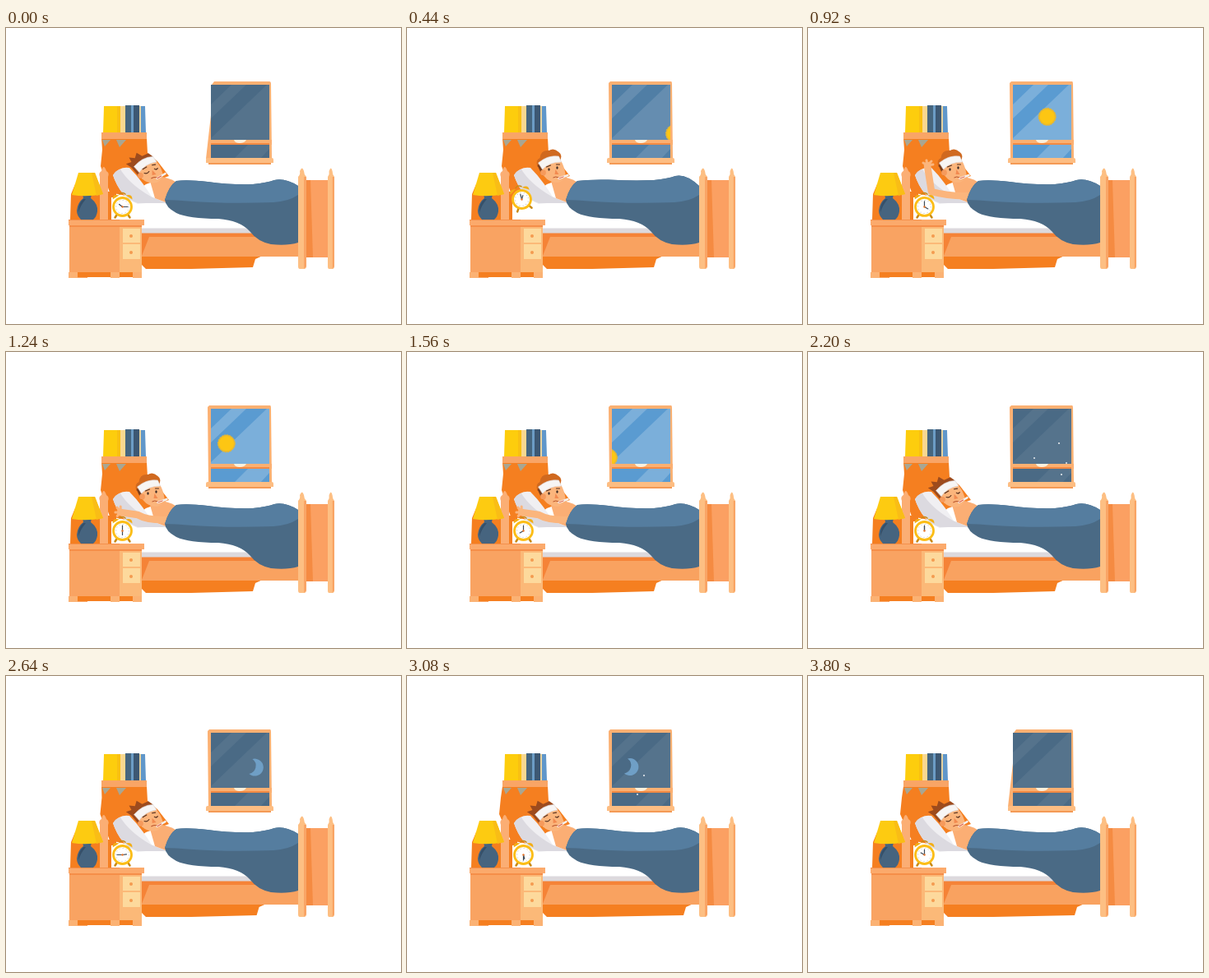
Recreate the animation shown at these times as an HTML page. Size 480 px wide and 360 px high, loop 3840 ms.

```html
<!DOCTYPE html>
<html>
<head>
<meta charset="utf-8">
<style>
html, body { margin: 0; width: 100%; height: 100%; overflow: hidden; background: #fff; }
svg { display: block; width: 480px; height: 360px; }
.awake .sleeping, .asleep .waking { display: none; }
</style>
</head>
<body>
<svg viewBox="0 0 480 360">
  <defs>
    <clipPath id="glass"><path d="M249 69h71v90h-71z"/></clipPath>
  </defs>

  <!-- wall and floor shade -->
  <g fill="#f57f20">
    <path id="wall"/>
    <path d="M84 190L79 202L78 233H134V200L117 198Z"/>
    <path id="floor"/>
  </g>

  <!-- window -->
  <path id="frame" fill="#fbb072"/>
  <g clip-path="url(#glass)">
    <path fill="#4a6a85" d="M249 69h71v90h-71z"/>
    <path id="day" fill="#5a9bd1" d="M249 69h71v90h-71z"/>
    <path id="glare" fill="#fff" d="M249 93L274 69H292L249 110ZM249 134L317 69H320V136H249ZM277 159L295 141H320V147L309 159Z"/>
    <g id="stars" fill="#fff"></g>
    <g id="sun"><circle r="10.500" fill="#e9b92f" stroke="#e9b92f" stroke-dasharray="2 1.300"/><circle r="9" fill="#fdc613"/></g>
    <path id="moon" fill="#6f9fc6" d="M-2 -10A10.500 10.500 0 1 1 -6 8A10 10 0 0 0 -2 -10Z"/>
  </g>
  <path fill="#fbb072" d="M247 136H323V142H247Z"/>
  <path fill="#f28a43" d="M249 140H320V142H249Z"/>
  <path fill="#fdf0dc" d="M277 136H292Q290 140 284 140T277 136Z"/>
  <path fill="#fdbd82" d="M243 160Q243 158 245 158H323Q325 158 325 160V164H243Z"/>
  <path fill="#f49a55" d="M246 164H322V166H246Z"/>

  <!-- shelf and books -->
  <path fill="#fdcd0d" d="M119 95H139V128H118Z"/>
  <path fill="#f9c011" d="M135 95H139V128H135Z"/>
  <path fill="#f9d88f" d="M139 95H145V128H139Z"/>
  <path fill="#46667f" d="M145 94H152V128H145Z"/>
  <path fill="#6c9cc5" d="M152 94H155V128H152Z"/>
  <path fill="#3d5873" d="M155 94H162V128H155Z"/>
  <path fill="#e6d3a0" d="M162 95H164V128H162Z"/>
  <path fill="#6097ca" d="M164 95H169L170 128H164Z"/>
  <path fill="#f9a566" d="M116 127H171V135H116Z"/>
  <path fill="#a9a692" d="M117 136H127L120 144ZM134 136H146L138 145Z"/>

  <!-- bed -->
  <path fill="#f9a260" d="M165 249H356V278H165Z"/>
  <path fill="#f58337" d="M165 249H312V254H174L165 277Z"/>
  <path fill="#fff" d="M128 206H290L306 249H165V236H128Z"/>
  <path fill="#dcd9dd" d="M165 243.500H301L306 249.500H165Z"/>
  <path fill="#f0eff2" d="M130 179Q138 168 150 170Q166 186 181 212L160 214Q139 206 130 179Z"/>
  <path fill="#dcdae0" d="M130 179Q133 173 139 172Q150 190 176 205L196 213H160Q139 206 130 179Z"/>
  <path fill="#fbae74" d="M116 174Q118.500 164 122 174Q126 176 124 181V233H114V181Q112 176 116 174Z"/>

  <!-- sleeper -->
  <path fill="#fbae74" d="M175 186L190 181Q204 184 208 189L194 212L181 207Z"/>
  <g id="arm" fill="none" stroke="#fbb57c" stroke-linecap="round" stroke-linejoin="round">
    <path id="limb" stroke-width="8.500"/>
    <path id="hand" stroke-width="3" d="M0 0L-5 -3M0 0L-1 -6M0 0L5 -5M0 0L7 -1"/>
  </g>
  <g id="head">
    <path class="sleeping" fill="#9d4b1d" d="M-20 -9L-26 -15L-19 -16L-21 -22L-14 -20L-11 -26L-5 -21L3 -23L8 -18L6 -9L-13 3Z"/>
    <g class="waking">
      <path fill="#d0691f" d="M-18 -5Q-21 -13 -15 -16Q-14 -26 -4 -25Q2 -29 8 -23Q13 -20 9 -11Z"/>
      <path fill="#7c3f1c" d="M-18 -7L9 -18L7 -12L-11 -1L-12 6Z"/>
    </g>
    <path fill="#fbb57c" d="M-13 -6L9 -15Q15 -6 16 4Q14 12 7 14Q-4 14 -10 6Z"/>
    <circle cx="-11" cy="2" r="3.400" fill="#f59a5c"/>
    <path fill="#f7f5f4" stroke="#dddbe0" stroke-width=".6" d="M-17 -10Q-5 -20 8 -18L11 -11Q-4 -11 -12 -2Z"/>
    <path fill="#f28a50" d="M4 -2L8 4L3 4Z"/>
    <g fill="none" stroke="#56301f" stroke-width="1.200" stroke-linecap="round">
      <path d="M-7 -5L-2 -7M5 -8L9 -8"/>
      <path class="sleeping" d="M-6 0Q-3 2 0 -1M7 -3Q9 -1 11 -3"/>
    </g>
    <g class="waking" fill="#3c2a25"><ellipse cx="-4" cy="-2" rx="1.200" ry="1.800"/><ellipse cx="6" cy="-4" rx="1.200" ry="1.700"/></g>
    <path fill="none" stroke="#b8532c" d="M1 8Q4 6 8 8"/>
    <path stroke="#f4f1ef" stroke-width="2.400" stroke-linecap="round" d="M8 9L19 5"/>
    <path stroke="#e45d3c" d="M8 9L14 6.800"/>
  </g>

  <!-- blanket -->
  <path id="blanket" fill="#4a6a85"/>
  <path id="fold" fill="#557d9f"/>

  <!-- footboard -->
  <path fill="#fba062" d="M364 185H393V279H364Z"/>
  <path fill="#f58b42" d="M364 185H370L373 279H364Z"/>
  <g id="post">
    <path fill="#fdbf83" d="M355 181Q358 178 357 174Q360 167 362 174Q362 178 365 181V290Q365 293 362 293H357Q355 293 355 290Z"/>
    <path fill="#f9a566" d="M362 181H365V290L362 293Z"/>
  </g>
  <use href="#post" transform="translate(107 0) scale(.8 1)"/>

  <!-- lamp -->
  <path fill="#46647f" d="M93 202H104L103 207Q112 214 111 223Q110 230 106 233H91Q86 228 86 222Q87 212 94 207Z"/>
  <path fill="#35506a" d="M94 208Q87 214 88 224Q91 215 97 208Z"/>
  <path fill="#fdcb11" d="M88 176H108L118 202Q98 206 80 203Z"/>
  <path fill="#f9bd16" d="M104 176H108L118 202L110 204Z"/>

  <!-- nightstand -->
  <path fill="#f9a362" d="M77 240H165V304H154V297H99V304H77Z"/>
  <path fill="#fbb978" d="M138 240H165V297H138Z"/>
  <path fill="#f57f20" d="M87 297H154V303H87Z"/>
  <path fill="#fbb274" d="M76 297H87V304H76ZM127 297H138V304H127ZM154 297H165V304H154Z"/>
  <path fill="#f58e49" d="M77 240H165V242H77Z"/>
  <path fill="#fbaa6c" d="M76 233H168V240H76Z"/>
  <path fill="#f4904c" d="M76 233H138V234H76Z"/>
  <path fill="#fdd99c" d="M142 244H163V261H142ZM142 263H163V281H142Z"/>
  <g fill="#f49b50"><circle cx="152" cy="253" r="2"/><circle cx="152" cy="273" r="2"/></g>

  <!-- alarm clock -->
  <g id="clock">
    <path stroke="#c98a16" stroke-width="2.500" stroke-linecap="round" d="M-7 10L-9 13M7 10L9 13"/>
    <path fill="#f3ae16" d="M-12 -9Q-12 -16 -4 -14ZM12 -9Q12 -16 4 -14Z"/>
    <path fill="none" stroke="#c98a16" stroke-width="1.500" d="M-4 -15Q0 -19 4 -15"/>
    <circle r="11" fill="#fff" stroke="#fbbd17" stroke-width="2.800"/>
    <circle r="8" fill="none" stroke="#a9a6aa" stroke-dasharray=".8 3.390"/>
    <g stroke="#3f4a55" stroke-width="1.200" stroke-linecap="round">
      <path id="hour" d="M0 0V-5"/>
      <path id="minute" d="M0 0V-6.500"/>
    </g>
    <circle r="1.200" fill="#e9772c"/>
  </g>
</svg>

<script>
const LOOP = 3840;
const HOP = 106.7, RING_START = 280, RING_END = RING_START + 7 * HOP;
const STARS = [[305, 111, 2200], [275, 129, 2220], [314, 135, 2180], [308, 149, 2200], [288, 121, 3080], [280, 144, 3060]];

const el = id => document.getElementById(id);
const set = (id, name, value) => el(id).setAttribute(name, value);
const move = (id, x, y, angle = 0) => set(id, 'transform', `translate(${x} ${y}) rotate(${angle})`);
const mix = (a, b, k) => a + (b - a) * k;
const ramp = (t, a, b) => {
  const k = Math.min(1, Math.max(0, (t - a) / (b - a)));
  return k * k * (3 - 2 * k);
};
const pulse = (t, a, b, c, d) => ramp(t, a, b) - ramp(t, c, d);

el('stars').innerHTML = STARS.map(([x, y]) => `<circle cx="${x}" cy="${y}" r=".9"/>`).join('');

// Sun and moon share the same arc across the window.
function cross(id, t, noon) {
  const x = 285 - 0.0713 * (t - noon);
  move(id, x, 107.5 + 0.0131 * (x - 285) ** 2);
}

function drawSky(t) {
  const day = pulse(t, 280, 640, 1700, 2100);
  set('day', 'opacity', day);
  set('glare', 'opacity', mix(0.06, 0.2, day));
  cross('sun', t, 1000);
  cross('moon', t, 2870);
  [...el('stars').children].forEach((star, i) =>
    star.setAttribute('opacity', Math.max(0, 1 - Math.abs(t - STARS[i][2]) / 400)));
  const narrow = t < 240 || t > 3400;
  set('frame', 'd', narrow
    ? 'M253 65H320Q322 65 322 68L323 159H243L249 106L250 69Z'
    : 'M247 65H321Q322 65 322 68L323 159H246L245 67Z');
}

function drawRoom(t) {
  const wide = ramp(t, 2500, 3000);
  const left = mix(115, 112, wide);
  set('wall', 'd', `M116 134H171L172 152L184 162L198 180L170 190L150 205L126 200L${left} 168L${left + 2} 148Z`);
  const shift = 24 * wide + 12 * pulse(t, 2900, 3050, 3200, 3700);
  set('floor', 'd', `M165 276H${314 + shift}L${303 + shift} 281L${300 + shift} 291L225 293H170L165 288Z`);
}

function drawSleeper(t) {
  const awake = pulse(t, 260, 400, 1840, 2060);
  move('head', mix(174, 176.5, awake), mix(175.5, 174, awake), mix(-10, 0, awake));
  set('head', 'class', awake > 0.5 ? 'awake' : 'asleep');

  const reach = pulse(t, 520, 720, 1720, 1920);
  const slap = ramp(t, 970, 1060);
  const elbowX = mix(196, mix(150, 160, slap), reach), elbowY = mix(203, mix(199, 198, slap), reach);
  const handX = mix(197, mix(145, 139, slap), reach), handY = mix(203, mix(167, 195, slap), reach);
  set('limb', 'd', `M197 204Q${mix(197, 172, reach)} 205 ${elbowX} ${elbowY}L${handX} ${handY}`);
  move('hand', handX, handY, -80 * slap);
  set('arm', 'opacity', reach > 0 ? 1 : 0);

  const lift = 5 * pulse(t, 260, 420, 480, 700);
  const top = `M193 209Q198 192 207 186Q220 184 245 ${187 - lift / 2}Q275 ${191 - lift} 300 ${190 - lift}Q318 ${188 - lift} 326 ${185 - lift}Q339 ${182 - lift} 355 192`;
  set('blanket', 'd', `${top}V261Q342 265 322 263Q306 260 296 247Q284 234 258 232Q222 232 207 225Q194 218 193 209Z`);
  set('fold', 'd', `${top}V203Q343 211 325 212Q270 214 228 211Q205 209 193 209Z`);
}

function drawClock(t) {
  const ringing = t > RING_START && t < RING_END;
  const phase = Math.PI * (t - RING_START) / HOP;
  const hop = ringing ? Math.abs(Math.sin(phase)) : 0;
  const tilt = ringing ? 15 * Math.sin(phase) : 0;
  move('clock', 141.5 - 2 * hop, 217.5 - 9 * hop, tilt);
  const hours = (t - 280) / 160;
  move('hour', 0, 0, hours * 30);
  move('minute', 0, 0, hours * 360);
}

function frame(now) {
  const t = Math.floor(now % LOOP / 40) * 40;
  drawSky(t);
  drawRoom(t);
  drawSleeper(t);
  drawClock(t);
  requestAnimationFrame(frame);
}
frame(performance.now());
</script>
</body>
</html>
```
